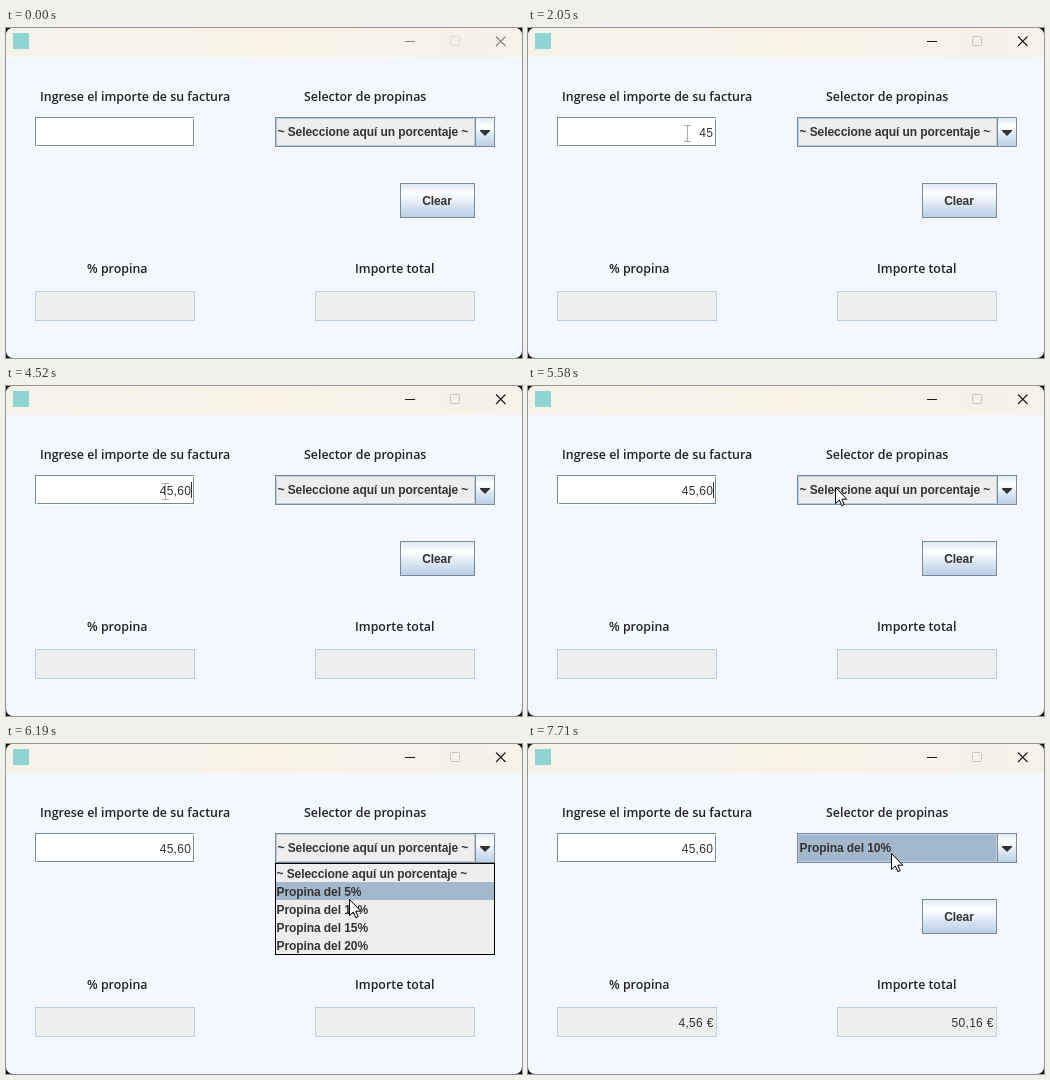
An HTML page for the animation above (8000 ms loop, 516 by 330 pixels).

```html
<!DOCTYPE html>
<html lang="es">
<head>
<meta charset="utf-8">
<title>Calculadora de propinas</title>
<style>
  html, body { margin: 0; width: 100%; height: 100%; overflow: hidden; background: #111; }
  svg { display: block; width: 516px; height: 330px; }
  text { fill: #333; font: 12px "Liberation Sans", Arial, sans-serif; white-space: pre; }
  .label { font: 600 12.4px "Open Sans", "Noto Sans", sans-serif; fill: #222; }
  .bold { font-weight: 700; letter-spacing: -.08px; }
  .num { text-anchor: end; letter-spacing: .3px; }
  .edge { stroke: #7a8a99; }
  .off { fill: #eee; stroke: #b8cfe5; }
  .line { fill: none; }
</style>
</head>
<body>
<svg viewBox="0 0 516 330">
  <defs>
    <linearGradient id="ocean" x2="0" y2="1">
      <stop offset="0" stop-color="#dde8f3"/>
      <stop offset=".3" stop-color="#fff"/>
      <stop offset=".6" stop-color="#dde8f3"/>
      <stop offset="1" stop-color="#b8cfe5"/>
    </linearGradient>
    <linearGradient id="bar">
      <stop offset="0" stop-color="#f5f2ea"/>
      <stop offset=".5" stop-color="#f8f2e6"/>
      <stop offset="1" stop-color="#f6f1e9"/>
    </linearGradient>
    <clipPath id="win"><rect width="516" height="330" rx="7"/></clipPath>
  </defs>

  <g clip-path="url(#win)">
    <rect width="516" height="330" fill="#f4f8fe"/>
    <rect width="516" height="29" fill="url(#bar)"/>
  </g>
  <rect x="7" y="5" width="16" height="16" fill="#8fd3d3"/>
  <g id="controls" class="line">
    <path d="M399 13.5h10M490 8.5l9.500 9.500m0-9.500l-9.500 9.500" stroke="#1a1a1a" stroke-width="1.1"/>
    <rect x="444.5" y="8.5" width="9" height="9" rx="1" stroke="#ccc8c0"/>
  </g>

  <text class="label" x="34" y="73">Ingrese el importe de su factura</text>
  <text class="label" x="298" y="73">Selector de propinas</text>
  <text class="label" x="81" y="245">% propina</text>
  <text class="label" x="349" y="245">Importe total</text>

  <rect class="edge" x="29.5" y="89.5" width="158" height="28" fill="#fff"/>
  <rect class="line" x="30.5" y="90.5" width="158" height="28" stroke="#fff"/>
  <text id="amount" class="num" x="185.2" y="109"></text>
  <path id="caret" d="M185.5 96v16" stroke="#333"/>

  <rect class="off" x="29.5" y="263.5" width="159" height="29"/>
  <rect class="off" x="309.5" y="263.5" width="159" height="29"/>
  <text id="tip" class="num" x="185.7" y="283"></text>
  <text id="total" class="num" x="465.7" y="283"></text>

  <rect class="edge line" x="269.5" y="89.5" width="200" height="29"/>
  <rect id="combo" x="270.5" y="90.5" width="198" height="27" stroke="#b8cfe5"/>
  <rect class="edge" x="469.5" y="89.5" width="19" height="29" fill="url(#ocean)"/>
  <path d="M474 102h10v1l-5 5l-5-5z" fill="#333"/>
  <text id="choice" class="bold" x="271.5" y="108"></text>

  <rect class="edge" x="394.5" y="155.5" width="74" height="34" fill="url(#ocean)"/>
  <text class="bold" x="431" y="177" text-anchor="middle">Clear</text>

  <g id="popup">
    <rect x="269.5" y="119.5" width="219" height="91" fill="#eee" stroke="#000"/>
    <rect id="hover" x="270" width="218" height="18" fill="#a3b8cc"/>
  </g>

  <circle id="click" r="12" fill="#ff0" fill-opacity=".5"/>
  <path id="arrow" d="M.5.5V16.5L4.3 13L6.8 18.7L9.2 17.7L6.8 12.2H11.8Z" fill="#fff" stroke="#000"/>
  <path id="beam" class="line" d="M-3.5-7.5h7M0-7V8M-3.5 8.5h7" stroke="#aaa"/>
</svg>
<script>
const LOOP = 8000, TICK = 66, BLINK = 525, HOLD = 130;
const FOCUS = 590, OPEN = 5650, PICK = 6790;
const AMOUNT = "45,60", RATE = 10;
const keyTimes = [1450, 1520, 2510, 4110, 4520];
const clicks = [FOCUS, OPEN, PICK];
// Pointer waypoints: departure, arrival, x, y.
const path = [
  [0, 0, 470, 330],
  [70, 520, 154, 104],
  [720, 860, 159.5, 105],
  [4920, 5050, 226, 102],
  [5320, 5580, 307, 101],
  [5790, 5920, 338, 145],
  [6190, 6390, 349, 167],
  [7320, 7710, 363, 109],
];

const $ = id => document.getElementById(id);
const show = (id, on) => $(id).style.display = on ? "" : "none";
const place = (id, x, y) => $(id).setAttribute("transform", `translate(${x} ${y})`);
const euros = n => n.toFixed(2).replace(".", ",") + " €";

const prompt = "~ Seleccione aquí un porcentaje ~";
const option = n => `Propina del ${n}%`;
const bill = parseFloat(AMOUNT.replace(",", "."));
const tip = bill * RATE / 100;

[prompt, ...[5, 10, 15, 20].map(option)].forEach((label, i) => {
  const row = document.createElementNS("http://www.w3.org/2000/svg", "text");
  row.setAttribute("class", "bold");
  row.setAttribute("x", 270.5);
  row.setAttribute("y", 134 + 18 * i);
  row.textContent = label;
  $("popup").append(row);
});

function pointer(t) {
  const i = Math.max(1, path.findLastIndex(p => p[0] <= t));
  const [, , x0, y0] = path[i - 1];
  const [start, end, x1, y1] = path[i];
  const steps = Math.round((end - start) / TICK) + 1;
  const step = Math.floor((t - start) / TICK + 1.1);
  const p = Math.max(0, Math.min(1, step / steps));
  const ease = p * (2 - p);
  return [x0 + (x1 - x0) * ease, y0 + (y1 - y0) * ease];
}

function caretOn(t) {
  const last = [FOCUS, ...keyTimes].findLast(k => k <= t);
  return t < OPEN + HOLD && Math.floor((t - last) / BLINK) % 2 === 0;
}

function draw(now) {
  const t = now % LOOP;
  const done = t >= PICK + HOLD;
  const [x, y] = pointer(t);
  const inField = x > 29 && x < 188 && y > 89 && y < 118;

  $("controls").setAttribute("opacity", t < FOCUS ? .5 : 1);
  $("amount").textContent = AMOUNT.slice(0, keyTimes.filter(k => k <= t).length);
  $("choice").textContent = done ? option(RATE) : prompt;
  $("combo").setAttribute("fill", done ? "#a3b8cc" : "#eee");
  $("tip").textContent = done ? euros(tip) : "";
  $("total").textContent = done ? euros(bill + tip) : "";
  $("hover").setAttribute("y", 120 + 18 * Math.max(0, Math.floor((y - 120) / 18)));

  show("caret", caretOn(t));
  show("popup", t >= OPEN + HOLD / 2 && !done);
  show("click", clicks.some(c => t >= c && t < c + HOLD));
  show("arrow", !inField);
  show("beam", inField);
  place("click", x, y);
  place("arrow", Math.round(x), Math.round(y));
  place("beam", x, y);
  requestAnimationFrame(draw);
}
requestAnimationFrame(draw);
</script>
</body>
</html>
```
